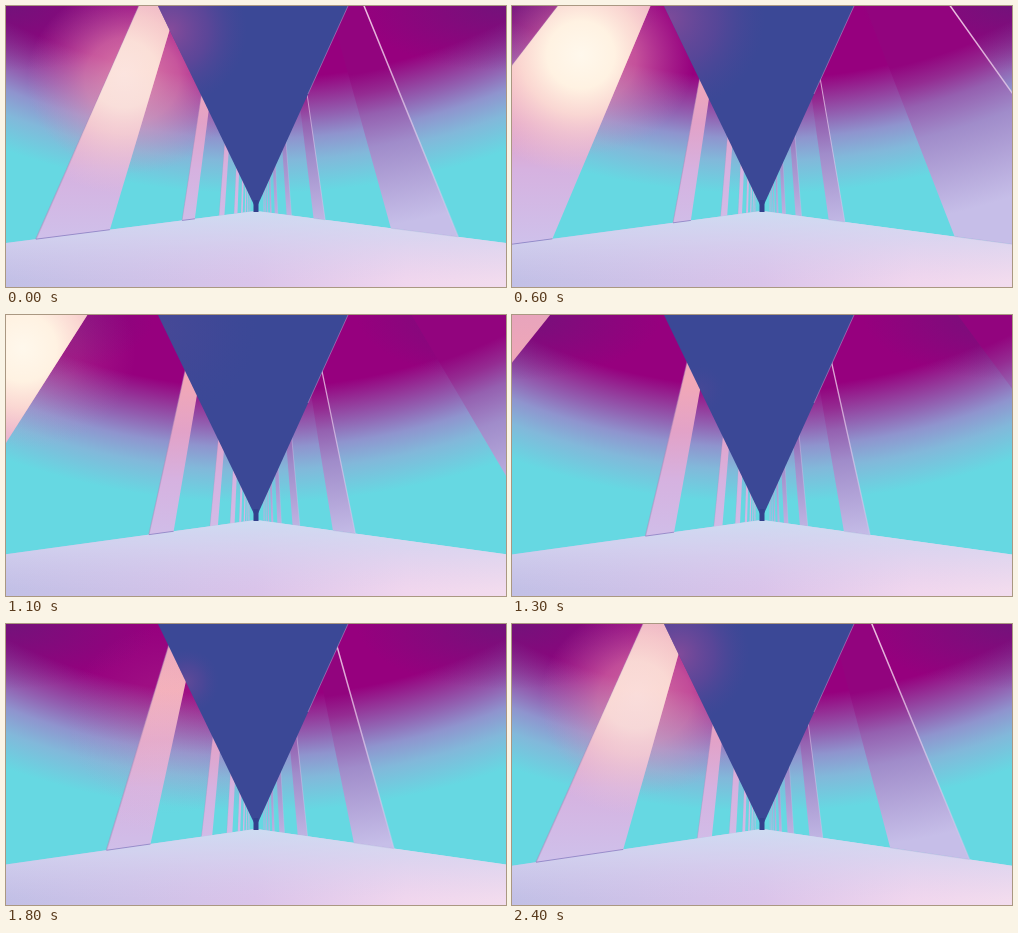
Animation, 500 px wide and 281 px high, one loop 2.5 s. Source, as an HTML page:

```html
<!DOCTYPE html>
<html lang="en">
<head>
<meta charset="utf-8">
<title>Corridor</title>
<style>
html, body { margin: 0; width: 100%; height: 100%; overflow: hidden; background: #66d8e2; }
svg { display: block; width: 100vw; height: 100vh; }
</style>
</head>
<body>
<svg viewBox="0 0 500 281" preserveAspectRatio="none">
  <defs>
    <radialGradient id="sky" gradientUnits="userSpaceOnUse" cx="0" cy="0" r="500" gradientTransform="translate(250 -300) scale(1.25 1)">
      <stop offset=".745" stop-color="#96007e"/>
      <stop offset=".79" stop-color="#94389a"/>
      <stop offset=".825" stop-color="#9262b2"/>
      <stop offset=".865" stop-color="#8f94ce"/>
      <stop offset=".91" stop-color="#82b8da"/>
      <stop offset=".975" stop-color="#66d8e2"/>
    </radialGradient>
    <radialGradient id="corner">
      <stop offset="0" stop-color="#5c1e78" stop-opacity=".6"/>
      <stop offset="1" stop-color="#5c1e78" stop-opacity="0"/>
    </radialGradient>
    <linearGradient id="leftWall" gradientUnits="userSpaceOnUse" x1="0" y1="0" x2="0" y2="235">
      <stop offset="0" stop-color="#e8a4bc"/>
      <stop offset=".28" stop-color="#f2a8b6"/>
      <stop offset=".5" stop-color="#e2a2c8"/>
      <stop offset=".7" stop-color="#d6b2e0"/>
      <stop offset="1" stop-color="#cfc0ea"/>
    </linearGradient>
    <radialGradient id="rightWall" gradientUnits="userSpaceOnUse" cx="0" cy="0" r="530" gradientTransform="translate(250 -300) scale(1.25 1)">
      <stop offset=".71" stop-color="#92047e"/>
      <stop offset=".75" stop-color="#942c92"/>
      <stop offset=".79" stop-color="#9560b0"/>
      <stop offset=".85" stop-color="#a08cca"/>
      <stop offset="1" stop-color="#c6bee8"/>
    </radialGradient>
    <linearGradient id="rim" gradientUnits="userSpaceOnUse" x1="0" y1="0" x2="0" y2="235">
      <stop offset="0" stop-color="#ffe4f4"/>
      <stop offset="1" stop-color="#d8c4ec" stop-opacity=".5"/>
    </linearGradient>
    <radialGradient id="sun" gradientUnits="userSpaceOnUse" r="120">
      <stop offset="0" stop-color="#fff8ec"/>
      <stop offset=".28" stop-color="#fff2e2"/>
      <stop offset=".5" stop-color="#fde0d6" stop-opacity=".85"/>
      <stop offset="1" stop-color="#f4c4d0" stop-opacity="0"/>
    </radialGradient>
    <radialGradient id="halo">
      <stop offset="0" stop-color="#fbb8bc" stop-opacity=".95"/>
      <stop offset=".45" stop-color="#f4a4b8" stop-opacity=".7"/>
      <stop offset="1" stop-color="#d888bc" stop-opacity="0"/>
    </radialGradient>
    <radialGradient id="tint">
      <stop offset="0" stop-color="#a04c9c"/>
      <stop offset=".5" stop-color="#78449a" stop-opacity=".7"/>
      <stop offset="1" stop-color="#504698" stop-opacity="0"/>
    </radialGradient>
    <linearGradient id="ground">
      <stop offset="0" stop-color="#c2c0e6"/>
      <stop offset=".5" stop-color="#dac4ea"/>
      <stop offset=".8" stop-color="#f0d6ee"/>
      <stop offset="1" stop-color="#f2dcee"/>
    </linearGradient>
    <linearGradient id="haze" gradientUnits="userSpaceOnUse" x1="0" y1="205" x2="0" y2="275">
      <stop offset="0" stop-color="#cedcf2"/>
      <stop offset=".4" stop-color="#d4d4f0" stop-opacity=".75"/>
      <stop offset="1" stop-color="#d8ccee" stop-opacity="0"/>
    </linearGradient>
    <clipPath id="roof"><path d="M152 0L250 203L342 0Z"/></clipPath>
  </defs>
  <rect width="500" height="281" fill="url(#sky)"/>
  <ellipse rx="150" ry="65" fill="url(#corner)"/>
  <ellipse cx="500" rx="150" ry="65" fill="url(#corner)"/>
  <ellipse id="glow" rx="105" ry="95" fill="url(#halo)"/>
  <g id="columns"></g>
  <path id="shine" fill="url(#sun)"/>
  <path id="floor" fill="url(#ground)"/>
  <path id="mist" fill="url(#haze)"/>
  <g id="bases" stroke="#7c62b4" stroke-width="1"></g>
  <g clip-path="url(#roof)">
    <rect width="500" height="281" fill="#3b4896"/>
    <circle id="reflection" fill="url(#tint)"/>
  </g>
  <path d="M342 0L302 88" stroke="#d8b0dc" stroke-width=".7" opacity=".6"/>
  <path d="M247.500 194H252.500V206H247.500Z" fill="#33408c"/>
</svg>
<script>
const COUNT = 9, STEP = 100, LOOP = 2500;
const ZENITH = { x: 250, y: -265 };
const get = id => document.getElementById(id);
const clamp = (v, lo, hi) => Math.max(lo, Math.min(hi, v));

function add(parent, tag, attrs) {
  const node = document.createElementNS("http://www.w3.org/2000/svg", tag);
  set(node, attrs);
  parent.append(node);
  return node;
}
function set(node, attrs) {
  for (const key in attrs) node.setAttribute(key, attrs[key]);
}

// Depth is the inverse of the half width between the two rows on the ground.
const rows = Array.from({ length: COUNT }, (_, n) => n < 3
  ? { depth: [.00477, .01408, .0278][n], speed: [.00036, .000393, .00049][n], width: [.0024, .0029, .0046][n] }
  : { depth: .046 + .02 * (n - 3), speed: .00062, width: .008 });

for (const row of [...rows].reverse()) {
  row.sides = [-1, 1].map(side => ({
    side,
    wall: add(get("columns"), "path", { fill: `url(#${side < 0 ? "left" : "right"}Wall)` }),
    rim: add(get("columns"), "path", { fill: "none", stroke: side < 0 ? "#b088b8" : "url(#rim)" }),
    base: add(get("bases"), "path", {})
  }));
}

function foot(depth, side, slope) {
  const half = 1 / Math.max(depth, .0004);
  const d = side < 0 ? 1.055 * half - 1 : .96 * half + 1;
  return { x: 250 + side * d, y: 205 + slope * d };
}

const at = p => `${p.x.toFixed(2)} ${p.y.toFixed(2)}`;

// Where a column edge meets the left border of the ceiling.
function tip(p) {
  const lean = (ZENITH.x - p.x) / (p.y - ZENITH.y), edge = 98 / 203;
  const y = Math.max(12, (p.x + lean * p.y - 152) / (edge + lean));
  return { x: 152 + edge * y, y };
}

function draw(step) {
  const slope = .128 + .0008 * step;
  for (const [n, row] of rows.entries()) {
    const depth = row.depth - row.speed * step;
    const visible = depth + row.width > .0019;
    for (const part of row.sides) {
      const near = foot(depth, part.side, slope);
      const far = foot(depth + row.width, part.side, slope);
      part.far = far;
      part.shape = visible ? `M${at(near)}L${at(far)}L${at(ZENITH)}Z` : "";
      set(part.wall, { d: part.shape });
      const size = clamp(.012 / Math.max(depth, .001), .2, 1.5);
      set(part.rim, { d: visible ? `M${at(near)}L${at(ZENITH)}` : "", "stroke-width": size, opacity: part.side < 0 ? .45 : .85 });
      set(part.base, { d: visible && n < 2 ? `M${at(near)}L${at(far)}` : "", opacity: part.side < 0 ? .6 : .12 });
    }
  }

  // Sunlight sweeps over one column per loop, rising before the cut.
  const drift = step > 12 ? step - LOOP / STEP : step;
  const lit = rows[step > 12 ? 1 : 0].sides[0];
  const sun = { x: 118 - 7 * drift - .2 * drift * drift, y: 68 - 3.2 * drift };
  const power = clamp(.75 + .09 * drift, 0, 1);
  set(get("sun"), { cx: sun.x, cy: sun.y });
  set(get("shine"), { d: lit.shape, opacity: power });
  set(get("glow"), { cx: sun.x + 8, cy: sun.y + 5, opacity: power * clamp((13 - drift) / 10, 0, 1) });

  const spot = tip(lit.far);
  set(get("reflection"), {
    cx: spot.x, cy: spot.y, r: 25 + 70 * power,
    opacity: .75 * clamp(drift < 0 ? 1 + drift / 14 : (12 - drift) / 7, 0, 1)
  });

  const edge = 205 + 250 * slope;
  const ground = `M0 ${edge}L246 205.500H254L500 ${edge}V281H0Z`;
  set(get("floor"), { d: ground });
  set(get("mist"), { d: ground });
}

function frame() {
  draw(Math.floor(performance.now() % LOOP / STEP));
  requestAnimationFrame(frame);
}
frame();
</script>
</body>
</html>
```
